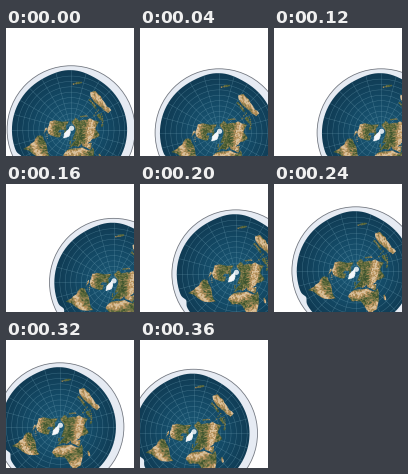
A matplotlib script for the animation above (400 ms loop, 128 px wide and 128 px high).

```python
import numpy as np
import matplotlib.pyplot as plt
from matplotlib.animation import FuncAnimation
from matplotlib.colors import LinearSegmentedColormap
from matplotlib.patches import Circle, PathPatch, Polygon
from matplotlib.path import Path

SIZE, DPI, FRAMES, STEP_MS = 128, 100, 10, 40
RADIUS = 64.4
PX = 72 / DPI
rng = np.random.default_rng(4)

fig = plt.figure(figsize=(SIZE / DPI, SIZE / DPI), dpi=DPI, facecolor="white")
ax = fig.add_axes([0, 0, 1, 1])
ax.axis("off")


def project(lon, lat):
    """Polar equidistant map, Greenwich pointing down (y grows downwards)."""
    a = np.radians(lon)
    r = RADIUS * (90 - np.asarray(lat)) / 180
    return np.column_stack([r * np.sin(a), r * np.cos(a)])


def bump(x, middle, width):
    return np.exp(-((x - middle) / width) ** 2)


def shoreline(*corners):
    """Outline through a few lon/lat corners, roughened by midpoint displacement."""
    xy = project(*np.array(corners).T)
    for _ in range(2):
        nxt = np.roll(xy, -1, axis=0)
        length = np.hypot(*(nxt - xy).T)[:, None]
        mid = (xy + nxt) / 2 + rng.uniform(-0.09, 0.09, xy.shape) * length
        xy = np.stack([xy, mid], axis=1).reshape(-1, 2)
    return Path(np.vstack([xy, xy[:1]]), closed=True)


def islands(start, end, count, size, spread=0):
    """Chain of islets between two lon/lat points."""
    lon, lat = np.linspace(start, end, count).T
    centers = project(lon, lat) + rng.uniform(-spread, spread, (count, 2))
    radii = size * rng.uniform(0.7, 1.3, count)
    return [Path.circle(c, r) for c, r in zip(centers, radii)]


def paint(values, cmap, area, z):
    image = ax.imshow(values, cmap=cmap, vmin=0, vmax=1, aspect="auto", zorder=z,
                      extent=(-RADIUS, RADIUS, RADIUS, -RADIUS))
    image.set_clip_path(area)


def stencil(path):
    return ax.add_patch(PathPatch(path, fc="none", ec="none"))


# Every map pixel knows its latitude and longitude
axis = np.linspace(-RADIUS, RADIUS, 2 * SIZE)
gx, gy = np.meshgrid(axis, axis)
dist = np.hypot(gx, gy) / RADIUS
lat_map = 90 - 180 * dist
lon_map = np.degrees(np.arctan2(gx, gy))
noise = np.kron(rng.normal(size=(SIZE, SIZE)), np.ones((2, 2)))
noise = (noise + np.roll(noise, 1, 0) + np.roll(noise, 1, 1)) / 2

# Ice rim, with two bays and a peninsula, around the ocean
ax.add_patch(Circle((0, 0), RADIUS - 0.4, fc="#e6ebf3", ec="#70757e", lw=0.8 * PX, zorder=0))
lon = np.arange(-180, 180)
ice_lat = (-71 + 4.4 * np.cos(np.radians(lon - 95)) + 8 * bump(lon, -62, 4)
           - 3.5 * bump(lon, -43, 12) - 6 * bump(np.abs(lon), 178, 17))
ocean = stencil(Path(project(lon, ice_lat), closed=False))
sea = LinearSegmentedColormap.from_list("sea", ["#1c5a78", "#144a66", "#0f3850"])
paint(dist, sea, ocean, 1)

for lat in range(-60, 90, 15):
    ring = ax.add_patch(Circle((0, 0), RADIUS * (90 - lat) / 180, fill=False, ec="#6fa0b4",
                               lw=0.5 * PX, alpha=0.45, zorder=2))
    ring.set_clip_path(ocean)
for meridian in range(0, 360, 15):
    x, y = project([meridian] * 2, [75, -85]).T
    line, = ax.plot(x, y, color="#6fa0b4", lw=0.5 * PX, alpha=0.45, zorder=2)
    line.set_clip_path(ocean)

north_america = shoreline(
    (-166, 66), (-125, 71), (-88, 68), (-90, 58), (-79, 53), (-75, 62), (-56, 52),
    (-80, 26), (-96, 20), (-80, 8), (-112, 26), (-124, 46), (-140, 60))
south_america = shoreline(
    (-78, 8), (-60, 10), (-36, -6), (-48, -27), (-68, -54), (-72, -20), (-80, -5))
eurasia = shoreline(
    (-9, 37), (-2, 46), (10, 55), (28, 60), (8, 60), (25, 71), (105, 77), (178, 67),
    (160, 54), (140, 57), (122, 38), (121, 28), (106, 9), (92, 22), (78, 8), (67, 25),
    (50, 30), (58, 22), (44, 13), (35, 34), (38, 41), (22, 38), (12, 44))
africa = shoreline(
    (-6, 36), (33, 31), (43, 11), (51, 12), (40, -10), (28, -33), (18, -34), (9, 4),
    (-8, 4), (-17, 15))
australia = shoreline(
    (114, -23), (131, -12), (142, -12), (153, -27), (148, -38), (131, -31), (116, -35))

lands = [north_america, south_america, eurasia, africa, australia]
lands += islands((96, 4), (118, -6), 7, 0.9, 0.6)
lands += islands((110, 2), (117, 3), 3, 1.5)
lands += islands((121, 16), (126, -4), 5, 0.7, 0.5)
lands += islands((132, -2), (148, -8), 6, 1.1)
lands += islands((168, -45), (177, -38), 6, 0.9)
lands += islands((46, -24), (49, -15), 5, 0.9)
lands += islands((131, 32), (143, 44), 5, 0.7)
lands += islands((-4, 51), (-4, 57), 3, 0.8)
lands += islands((-120, 72), (-70, 74), 7, 1.0, 0.8)
lands += islands((-82, 22), (-70, 19), 4, 0.5)

# Terrain: dry belts near the tropics, further north in inner Asia
belt = 24 + 15 * bump(lon_map, 85, 30)
dry = bump(np.abs(lat_map), belt, 12) * 0.75 + 0.22 + 0.17 * noise
terrain = LinearSegmentedColormap.from_list(
    "terrain", ["#3c5230", "#5f6b3c", "#8f8052", "#bb935c", "#d9c09a"])
for land in lands:
    paint(dry, terrain, stencil(land), 3)

# Arctic ice
ax.add_patch(Circle((0.5, -1.5), 2.6, fc="#d5e0e8", ec="none", zorder=4))
greenland = shoreline((-75, 78), (-130, 84), (-20, 83), (-20, 71), (-42, 59), (-56, 67))
ax.add_patch(Polygon(greenland.vertices, fc="#f6f8fb", ec="#f6f8fb", lw=0.8 * PX, zorder=5))


def drift(i, speed, start, limit):
    """Steady to-and-fro motion, held at its limits."""
    phase = (i - start + FRAMES / 4) % FRAMES
    return np.clip(speed * (FRAMES / 4 - abs(phase - FRAMES / 2)), -limit, limit)


def update(i):
    cx = 80.5 + drift(i, 14, 1.1, 27)
    cy = 95.8 + drift(i, 8.5, -0.7, 9)
    ax.set_xlim(-cx, SIZE - cx)
    ax.set_ylim(SIZE - cy, -cy)
    return []


update(0)
anim = FuncAnimation(fig, update, frames=FRAMES, interval=STEP_MS, repeat=True,
                     repeat_delay=0, blit=False)
plt.show()
```
